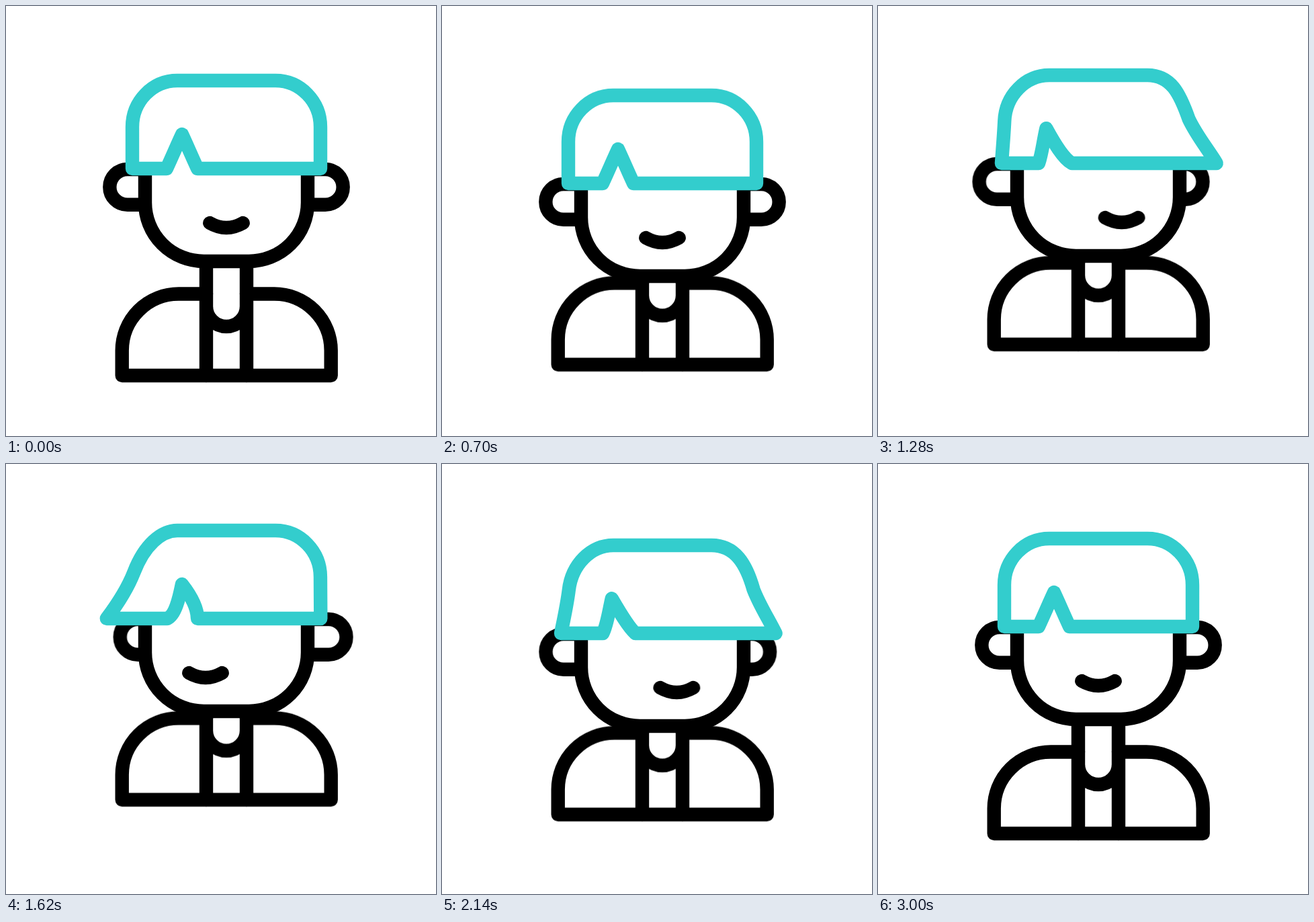
These frames come from a looping animation (640x640 px, 3.22 s). An HTML page without scripts:

```html
<!DOCTYPE html>
<html lang="en">
<head>
<meta charset="utf-8">
<title>Head turn</title>
<style>
html, body { margin: 0; width: 100%; height: 100%; overflow: hidden; background: #fff; }
svg { display: block; width: 100%; height: 100%; }
path { fill: none; stroke: #000; stroke-width: 20.4; stroke-linecap: round; stroke-linejoin: round; }
.body, .head, .turn, .hair {
  animation: 3220ms cubic-bezier(.333, 0, .667, 1) infinite;
}
.body { animation-name: rise; }
.head { animation-name: sink; }
.turn { animation-name: turn; }
.hair { animation-name: sway; stroke: #33cdcd; }
.flat { stroke-linecap: butt; }
.face { fill: #fff; stroke: none; }

/* --r and --l: shift when the head looks right or left */
.mouth { --r: 42.5px; --l: -31.6px; }
.ear-l { --r: -6px; --l: 15.6px; }
.ear-r { --r: -21px; --l: 5px; }

@keyframes rise {
  0%, 6.21%, 88.51%, 100% { transform: translateY(0); }
  47.52% { transform: translateY(-51px); }
}
@keyframes sink {
  0%, 6.21%, 93.17%, 100% { transform: translateY(0); }
  18.32%, 81.37% { transform: translateY(38.3px); }
}
@keyframes turn {
  0%, 24.84%, 80.75%, 100% { transform: translateX(0); }
  37.27%, 62.11% { transform: translateX(var(--r)); }
  49.69%, 74.53% { transform: translateX(var(--l)); }
}
@keyframes sway {
  0%, 24.84%, 80.75%, 100% {
    d: path("M188 242 C188 221 188 201 188 180 C188 142 218 111 255 111 L401 111 C438 111 468 142 468 180 C468 201 468 221 468 242 L285 242 C277 225 270 208 262 191 C254 208 247 225 239 242 Z");
  }
  37.27%, 62.11% {
    d: path("M188 242 C188 221 188 201 188 180 C188 142 218 111 255 111 L401 111 C436 111 447 138 462 176 C475 201 493 220 508 242 L289 242 C274 236 260 211 249 190 C245 206 243 228 239 242 Z");
  }
  49.69%, 74.53% {
    d: path("M149.5 242 C164 223 181 197 190.5 173 C206 133 231 111 255 111 L401 111 C438 111 468 142 468 180 C468 201 468 221 468 242 L285 242 C285 224 273 205 262 191 C258 211 252 237 240 242 Z");
  }
}
</style>
</head>
<body>
<svg viewBox="0 0 640 640">
  <g class="body">
    <path d="M298 428.5 H257 A84.3 84.3 0 0 0 172.7 512.8 V550 H483.7 V512.8 A84.3 84.3 0 0 0 399.4 428.5 H358"/>
    <path d="M298 380 V550 M358 380 V550 M298 447 A30 30 0 0 0 358 447"/>
    <g class="head">
      <path class="turn ear-l flat" d="M207 243 H180.7 A26.4 26.4 0 0 0 180.7 295.8 H207"/>
      <path class="turn ear-r flat" d="M449 243 H475.3 A26.4 26.4 0 0 1 475.3 295.8 H449"/>
      <path class="face" d="M207 242 V292.5 A87.5 87.5 0 0 0 294.5 380 H361.5 A87.5 87.5 0 0 0 449 292.5 V242 Z"/>
      <path class="flat" d="M207 242 V292.5 A87.5 87.5 0 0 0 294.5 380 H361.5 A87.5 87.5 0 0 0 449 292.5 V242"/>
      <path class="turn mouth" d="M303.3 323 Q328 337 352.7 323"/>
      <path class="hair" d="M188 242 C188 221 188 201 188 180 C188 142 218 111 255 111 L401 111 C438 111 468 142 468 180 C468 201 468 221 468 242 L285 242 C277 225 270 208 262 191 C254 208 247 225 239 242 Z"/>
    </g>
  </g>
</svg>
</body>
</html>
```
